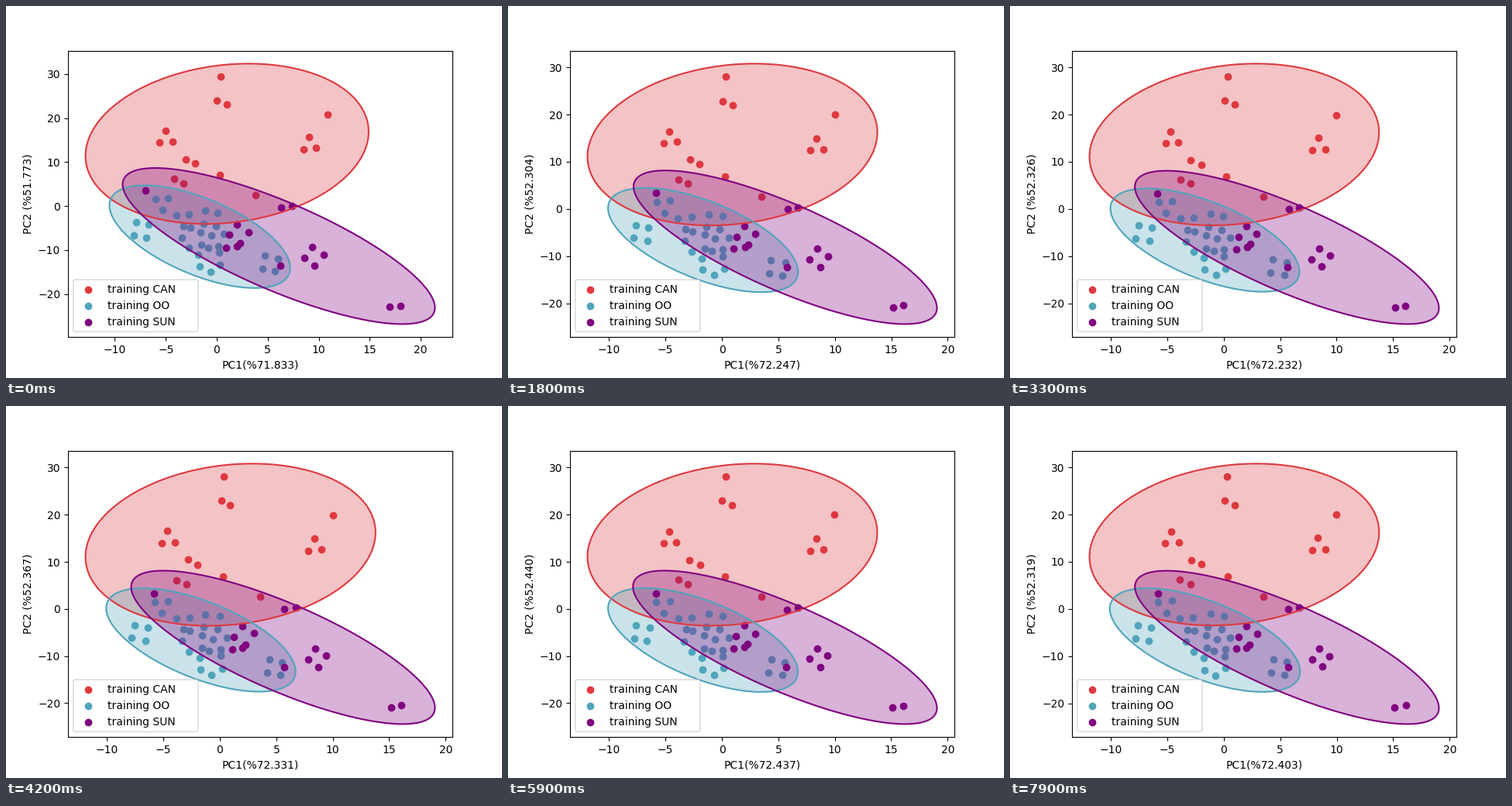
These frames come from a looping animation (640x480 px, 8000 ms). A matplotlib script:

```python
import numpy as np
import matplotlib.pyplot as plt
from matplotlib.animation import FuncAnimation
from matplotlib.patches import FancyBboxPatch, Polygon

STEPS, INTERVAL = 80, 100
K = np.sqrt(5.991)  # 95 % confidence radius
ANGLE = np.linspace(0, 2 * np.pi, 200, endpoint=False)
CIRCLE = np.column_stack([np.cos(ANGLE), np.sin(ANGLE)])
UNIT = np.array([1 / 14.56, 1 / 6.054])  # one pixel in scores

# Explained variance at a few steps; the first run stands apart
KEY_STEPS = [0, 1, 6, 18, 33, 50, 67, 79]
PC1 = [71.833, 72.3, 72.279, 72.247, 72.232, 72.419, 72.453, 72.403]
PC2 = [51.773, 52.35, 52.404, 52.304, 52.326, 52.404, 52.472, 52.319]


class Group:
    """Clusters of samples fitted to a known centre, reach and correlation."""

    def __init__(self, color, rho, turn, hubs, first, rest):
        self.color, self.rho = color, rho
        self.first, self.rest = first, rest
        pts = np.vstack([self.ring(*hub, turn) for hub in hubs])
        root = np.linalg.cholesky(np.cov(pts.T))
        self.z = np.linalg.solve(root, (pts - pts.mean(0)).T).T

    @staticmethod
    def ring(x, y, n, turn):
        a = np.radians(turn) + 2 * np.pi * np.arange(n) / n
        radius = 7 * np.sqrt(n - 1)
        return (x, y) + radius * UNIT * np.column_stack([np.cos(a), np.sin(a)])

    def scores(self, step, rng):
        x, y, reach_x, reach_y = self.rest if step else self.first
        root = np.linalg.cholesky([[1, self.rho], [self.rho, 1]])
        pts = (x, y) + self.z @ root.T * (reach_x / K, reach_y / K)
        return pts + rng.normal(0, (0.03, 0.05), pts.shape)


# hubs: x, y, samples; first and rest: centre x, y and reach of the ellipse
GROUPS = {
    "CAN": Group("#dd393f", 0.15, -25,
                 [(-4.6, 14.85, 3), (8.4, 13.25, 3), (0.5, 22.4, 2),
                  (-2.4, 9.9, 2), (-3.4, 5.75, 2), (0.35, 28, 1),
                  (10, 19.8, 1), (0.3, 6.9, 1), (3.5, 2.6, 1)],
                 first=(1, 14.15, 13.84, 18.16),
                 rest=(0.93, 13.64, 12.84, 17.15)),
    "OO": Group("#50a4bb", -0.61, 35,
                [(-5.1, 0.8, 3), (-3.2, -2.7, 3), (-0.7, -2.6, 4),
                 (-7, -5.1, 4), (-2.3, -6.9, 5), (0, -7, 3),
                 (-0.8, -11.5, 6), (4.8, -12.4, 4)],
                first=(-1.67, -6.96, 8.87, 11.63),
                rest=(-1.68, -6.59, 8.41, 10.97)),
    "SUN": Group("purple", -0.79, 10,
                 [(-5.9, 2.95, 1), (6.2, -0.1, 2), (2.1, -5.9, 4),
                  (1.5, -8.7, 2), (5.7, -12.7, 1), (8.55, -10.6, 4),
                  (15.6, -21, 2)],
                 first=(6.07, -9.09, 15.33, 17.7),
                 rest=(5.6, -8.14, 13.46, 16.25)),
}


def outline(pts):
    root = np.linalg.cholesky(np.cov(pts.T))
    return pts.mean(0) + K * CIRCLE @ root.T


fig, ax = plt.subplots(figsize=(6.4, 4.8), dpi=100)
dots, fills, edges = {}, {}, {}
for name, group in GROUPS.items():
    dots[name] = ax.scatter(*group.z.T, color=group.color,
                            label=f"training {name}")
    fills[name] = ax.add_patch(Polygon(CIRCLE, fc=group.color, ec="none",
                                       lw=0, alpha=0.3))
    edges[name] = ax.add_patch(Polygon(CIRCLE, fc="none", ec=group.color,
                                       lw=1.5, zorder=2))

ax.add_artist(FancyBboxPatch((86.9, 59.7), 161, 67.2, transform=None,
                             boxstyle="round,pad=0,rounding_size=0.2",
                             mutation_scale=13.9, fc="white", ec="0.8",
                             alpha=0.8, zorder=4.9))
ax.legend(loc="lower left", frameon=False)


def update(step):
    rng = np.random.default_rng(100 + step)
    curves = []
    for name, group in GROUPS.items():
        pts = group.scores(step, rng)
        curve = outline(pts)
        dots[name].set_offsets(pts)
        fills[name].set_xy(curve)
        edges[name].set_xy(curve)
        curves.append(curve)
    curves = np.vstack(curves)
    low, high = curves.min(0), curves.max(0)
    pad = 0.05 * (high - low)
    ax.set_xlim(low[0] - pad[0], high[0] + pad[0])
    ax.set_ylim(low[1] - pad[1], high[1] + pad[1])
    ax.set_xlabel(f"PC1(%{np.interp(step, KEY_STEPS, PC1):.3f})")
    ax.set_ylabel(f"PC2 (%{np.interp(step, KEY_STEPS, PC2):.3f})")
    return []


anim = FuncAnimation(fig, update, frames=STEPS, interval=INTERVAL,
                     repeat=True, repeat_delay=0, blit=False)
plt.show()
```
